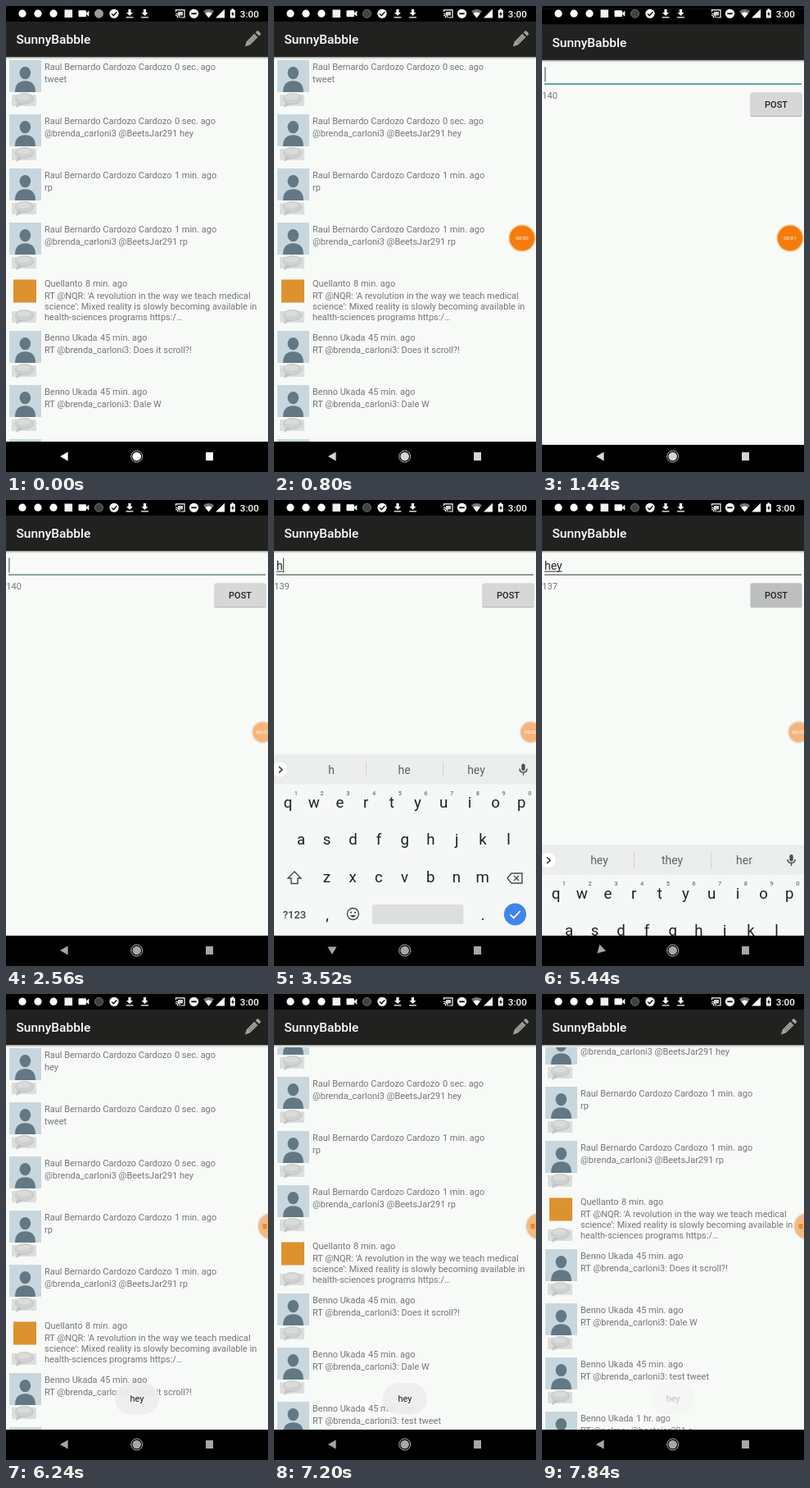
Animation, 320 px wide and 568 px high, one loop 8000 ms. Source, as an HTML page:

```html
<!DOCTYPE html>
<html lang="en">
<head>
<meta charset="utf-8">
<title>SunnyBabble</title>
<style>
html, body { margin: 0; width: 100%; height: 100%; overflow: hidden; background: #000; }
svg { display: block; width: 320px; height: 568px; font-family: Roboto, sans-serif; }
.body { font-size: 10.97px; fill: #747675; }
.title { font-size: 15.56px; font-weight: 500; fill: #fff; }
.mid { text-anchor: middle; }
.key { font-size: 18.7px; fill: #1d2123; text-anchor: middle; }
.hint { font-size: 7.5px; font-weight: 500; fill: #6f7476; text-anchor: middle; }
.sug { font-size: 14px; fill: #5d6365; text-anchor: middle; }
.line { fill: none; stroke: #454a4c; stroke-width: 1.4; }
</style>
</head>
<body>
<svg id="stage" viewBox="0 0 320 568"></svg>
<script>
const LOOP = 8000, STEP = 160, ROW = 66;
const ME = 'Raul Bernardo Cardozo Cardozo', PAL = 'Benno Ukada';
const A = '@brenda_carloni3', B = '@BeetsJar291';

const posts = [
  [ME, '0 sec. ago', 'hey'],
  [ME, '0 sec. ago', 'tweet'],
  [ME, '0 sec. ago', `${A} ${B} hey`],
  [ME, '1 min. ago', 'rp'],
  [ME, '1 min. ago', `${A} ${B} rp`],
  ['Quellanto', '8 min. ago', "RT @NQR: 'A revolution in the way we teach medical",
    "science': Mixed reality is slowly becoming available in", 'health-sciences programs https:/…'],
  [PAL, '45 min. ago', `RT ${A}: Does it scroll?!`],
  [PAL, '45 min. ago', `RT ${A}: Dale W`],
  [PAL, '45 min. ago', `RT ${A}: test tweet`],
  [PAL, '1 hr. ago', 'RT @pelmo: @beetsjar291 s']
];

const rect = (x, y, w, h, fill, more = '') =>
  `<rect x="${x}" y="${y}" width="${w}" height="${h}" fill="${fill}" ${more}/>`;
const disc = (x, y, r, fill, more = '') =>
  `<circle cx="${x}" cy="${y}" r="${r}" fill="${fill}" ${more}/>`;
const oval = (x, y, rx, ry, fill, more = '') =>
  `<ellipse cx="${x}" cy="${y}" rx="${rx}" ry="${ry}" fill="${fill}" ${more}/>`;
const path = (d, fill, more = '') => `<path d="${d}" fill="${fill}" ${more}/>`;
const text = (x, y, cls, s, more = '') => `<text x="${x}" y="${y}" class="${cls}" ${more}>${s}</text>`;

const person = rect(4, 4, 39, 39, '#c8d7de') +
  path('M11 43C11 34 15 29.3 23.5 29.3S36 34 36 43Z', '#627985') +
  oval(23.4, 19.6, 6.8, 7.7, '#627985');
const square = rect(9, 7.5, 28, 28, '#dc922f');
const reply = rect(7, 46, 30, 14, '#dcdedd', 'rx="1"') +
  path('M14 55L12 62L22 57Z', '#c3c5c4') +
  oval(22.5, 51, 11, 6.6, '#cfd1d0', 'stroke="#bbbdbc" stroke-width=".7"') +
  oval(21.5, 49, 8.5, 3.6, '#dadcdb');

function post([name, when, ...lines], i) {
  return `<g transform="translate(0 ${62 + i * ROW})">` +
    (lines.length > 1 ? square : person) + reply +
    text(47, 16, 'body', `${name}<tspan dx="3.5">${when}</tspan>`) +
    lines.map((s, n) => text(47, 31 + n * 13, 'body', s)).join('') + '</g>';
}

const appBar = rect(0, 62, 320, 1, '#a4a6a4') + rect(0, 63, 320, 1, '#d2d4d2') + rect(0, 64, 320, 1, '#eaecea') +
  rect(0, 0, 320, 19, '#000') + rect(0, 19, 320, 43, '#212220') +
  text(12.4, 46.3, 'title', 'SunnyBabble');
const pencil = `<g transform="translate(301 40.3) rotate(45)" fill="#a3a5a2">
  <path d="M-3-6.2H3V7L0 13L-3 7Z"/><path d="M-3-8.4V-10.8Q-3-12 -1.8-12H1.8Q3-12 3-10.8V-8.4Z"/>
  <path d="M-1-5V6.5M1.2-5V6.5" stroke="#5d5f5c" stroke-width=".7"/></g>`;

const feed = rect(0, 0, 320, 568, '#f8faf8') + '<g id="list"></g>' + appBar + pencil + rect(0, 531, 320, 37, '#000');

const compose = rect(0, 0, 320, 568, '#f8faf8') + appBar +
  rect(3, 90.4, 314, 1.5, '#2f8f86', 'id="rule"') +
  text(3, 84.5, 'input', '', 'id="input" font-size="14" fill="#232625"') +
  rect(3, 86.6, 0, 1, '#333', 'id="under"') +
  rect(3.4, 70.5, 1, 18, '#3b403e', 'id="caret"') +
  text(0.3, 109, 'body', '140', 'id="count"') +
  rect(254.5, 102, 63, 29.2, '#b9bbba', 'rx="1.6"') +
  rect(255, 101.3, 62, 28.6, '#d6d7d6', 'rx="1.6" id="post"') +
  text(286, 119.8, 'mid', 'POST', 'font-size="10.97" font-weight="500" fill="#222"') +
  rect(0, 531, 320, 37, '#000');

// Keyboard
const keyAt = {};
function keys(letters, x, y) {
  return [...letters].map((c, i) => {
    const kx = x + i * 31.7;
    keyAt[c] = [kx, y];
    return text(kx, y + 6, 'key', c);
  }).join('');
}
const keyboard = rect(0, 310, 320, 221, '#f6f8f7') + rect(0, 310, 320, 36.5, '#eceeed') +
  rect(112, 319, .8, 19, '#c9cccb') + rect(206, 319, .8, 19, '#c9cccb') +
  disc(7.5, 328.5, 9, '#fff') + path('M6 325L10 328.7L6 332.4', 'none', 'stroke="#333" stroke-width="1.5"') +
  [70, 159, 247].map((x, i) => text(x, 333.6, 'sug', '', `id="sug${i}"`)).join('') +
  rect(302.3, 321.5, 4.4, 8.4, '#4d5355', 'rx="2.2"') +
  path('M300 327.5Q300 332 304.5 332T309 327.5M304.5 332V335.5', 'none', 'class="line"') +
  keys('qwertyuiop', 17, 369) + keys('asdfghjkl', 33, 414) + keys('zxcvbnm', 64.5, 460) +
  [...'1234567890'].map((c, i) => text(27 + i * 31.7, 359.5, 'hint', c)).join('') +
  path('M25 453L33 461H29V467.5H21V461H17Z', 'none', 'class="line"') +
  path('M285 461L290 455H303V467H290Z M293 458L299 464M299 458L293 464', 'none', 'class="line"') +
  text(25, 509.5, 'mid', '?123', 'font-size="13" font-weight="500" fill="#3e4446"') +
  text(65, 512, 'key', ',') + text(255, 512, 'key', '.') +
  disc(96.5, 504.5, 7, 'none', 'class="line"') + disc(94, 502.8, 1.1, '#454a4c') + disc(99, 502.8, 1.1, '#454a4c') +
  path('M92.8 506Q96.5 511.5 100.2 506Z', '#454a4c') +
  rect(120, 493, 111.5, 24, '#dcdfde', 'rx="2"') +
  disc(294.5, 505, 13.6, '#4285ea') + path('M288.5 505.3L292.7 509.4L300.8 501', 'none', 'stroke="#fff" stroke-width="1.8"') +
  '<g id="pop">' + rect(-16.6, -74, 33.6, 94, '#000', 'rx="3" opacity=".13"') +
  rect(-15.8, -74, 32, 92, '#f5f7f6', 'rx="2.5"') +
  text(0, -42.5, 'mid', 'y', 'id="popKey" font-size="21" fill="#111"') +
  text(9.5, -35, 'mid', '…', 'font-size="9" fill="#222"') + '</g>';

// System chrome
const download = x => path(`M${x - 1.6} 4H${x + 1.6}V8H${x + 4}L${x} 12L${x - 4} 8H${x - 1.6}Z M${x - 4.4} 13.3H${x + 4.4}V14.6H${x - 4.4}Z`, '#fff');
const status = [20, 39, 58].map(x => disc(x, 9.2, 4.6, '#fff')).join('') +
  rect(71.5, 4.5, 9.6, 9.6, '#f0f0f0') +
  rect(88.5, 5.3, 9.5, 8, '#fff', 'rx="1.2"') + path('M98 8.5L101.3 5.8V12.8L98 10Z', '#fff') +
  disc(113.5, 9.3, 5, '#9a9c9b', 'id="dot"') +
  disc(132, 9.3, 5.6, '#fff') + path('M129 9.4L131.3 11.7L135.3 7.2', 'none', 'stroke="#000" stroke-width="1.3"') +
  download(151) + download(169.5) +
  path('M207.5 7V4.8H218V14H213.5', 'none', 'stroke="#fff" stroke-width="1.2"') +
  path('M207 9A5.5 5.5 0 0 1 212.3 14.4M207 11.4A3 3 0 0 1 210 14.4', 'none', 'stroke="#fff" stroke-width="1.1"') +
  rect(210, 7, 6, 4.5, '#fff', 'opacity=".8"') +
  disc(229.5, 9.3, 5.6, '#fff') + rect(226.3, 8.4, 6.4, 1.8, '#000') +
  path('M241 6.2Q247.5 1.8 254 6.2L247.5 14.4Z', '#777') + path('M243.3 9Q247.5 6 251.7 9L247.5 14.4Z', '#fff') +
  path('M256 14.4L267 3.8V14.4Z', '#fff') +
  path('M273.8 5H275.4V3.6H278.2V5H279.8V14.6H273.8Z', '#fff') + path('M277.5 6.3L275 10.3H276.6V13L278.8 9.1H277.3Z', '#000') +
  text(285.8, 13.6, '', '3:00', 'font-size="11.7" font-weight="500" fill="#fff"');
const nav = '<g id="nav">' + '<path id="back" d="M66 549L75.6 543.5V554.5Z"/>' +
  '<circle cx="159.7" cy="549" r="5.3"/><circle cx="159.7" cy="549" r="7" fill="none" stroke="#b4b7b4"/>' +
  '<rect x="244" y="544" width="9" height="10"/></g>';

const toast = '<g id="toast">' + rect(133, 474, 54, 38.5, '#ededed', 'rx="19.2" opacity=".94"') +
  text(160, 497, 'mid', 'hey', 'font-size="10.97" fill="#1c1c1c"') + '</g>';
const bubble = '<g id="bubble">' + disc(0, 0, 16, '#f57c0a', 'id="ball" stroke-width="1.6"') +
  text(0, 2.2, 'mid', '', 'id="clock" font-size="6.2" fill="#fff"') +
  path('M-10.5-3H-5.5V2.5L-8 3.8L-10.5 2.5Z', '#ef8a1d', 'id="cam"') + '</g>';

document.getElementById('stage').innerHTML =
  `<defs><clipPath id="clip"><rect width="320" height="531"/></clipPath></defs>` +
  feed + `<g id="compose">${compose}</g><g clip-path="url(#clip)"><g id="kb">${keyboard}</g></g>` +
  toast + status + nav + bubble;

const el = {};
document.querySelectorAll('[id]').forEach(n => el[n.id] = n);
const set = (id, attrs) => { for (const k in attrs) el[id].setAttribute(k, attrs[k]); };
const show = (id, on) => { el[id].style.display = on ? '' : 'none'; };
const move = (id, x, y) => set(id, { transform: `translate(${x} ${y})` });
const clamp = v => Math.max(0, Math.min(1, v));
const prog = (t, from, span) => clamp((t - from) / span);
const at = (steps, t) => steps.filter(s => s[0] <= t).pop();
function glide(points, t) {
  const i = points.findIndex(p => p[0] > t);
  if (i === 0) return points[0][1];
  if (i < 0) return points[points.length - 1][1];
  const [a, b] = [points[i - 1], points[i]];
  return a[1] + (b[1] - a[1]) * (t - a[0]) / (b[0] - a[0]);
}

const typed = [[0, ''], [3360, 'h'], [3840, 'he'], [4640, 'hey']];
const presses = [[0, ''], [3200, 'h'], [3360, ''], [3680, 'e'], [3840, ''], [4480, 'y'], [4640, '']];
const guesses = { '': ['', '', ''], h: ['h', 'he', 'hey'], he: ['he', 'hello', 'hey'], hey: ['hey', 'they', 'her'] };
const scroll = [[6400, 0], [7200, 97], [7840, 151]];
const rules = [[0, '#2f8f86'], [2400, '#6b8d84'], [2880, '#757a77']];
const navTints = [[0, '#fff'], [320, '#d2d5d2'], [2400, '#a4a8a4']];
const OPEN = 1280, CLOSE = 5440, SLIDE = 45;

let updated = null;
function render(t) {
  const fresh = t >= CLOSE;
  if (updated !== fresh) {
    updated = fresh;
    el.list.innerHTML = (fresh ? posts : posts.slice(1)).map(post).join('');
  }
  move('list', 0, -glide(scroll, t));

  // Compose window: quick fade up on opening, drop and fade on closing
  const rise = (1 - prog(t, OPEN, 350)) ** 4, drop = prog(t, CLOSE, 250) ** 4;
  const alpha = (1 - (1 - prog(t, OPEN, 200)) ** 4) * (1 - prog(t, CLOSE + 100, 150));
  move('compose', 0, SLIDE * (rise + drop));
  set('compose', { opacity: alpha });
  set('rule', { fill: at(rules, t)[1] });
  set('post', { fill: t >= 5280 && t < 5600 ? '#bdbfbe' : '#d6d7d6' });

  const [since, word] = at(typed, t);
  el.input.textContent = word;
  el.count.textContent = 140 - word.length;
  const width = word ? el.input.getComputedTextLength() : 0;
  set('under', { width });
  set('caret', { x: 3.4 + width });
  show('caret', Math.floor((t - (since || 1440)) / 500) % 2 === 0);

  const kb = (1 - (1 - prog(t, 2800, 200)) ** 2) * (1 - prog(t, 5360, 160));
  move('kb', 0, 221 * (1 - kb));
  set('back', { transform: `rotate(${-90 * kb} 71 549)` });
  guesses[word].forEach((s, i) => el['sug' + i].textContent = s);
  const down = at(presses, t)[1];
  show('pop', down);
  if (down) {
    move('pop', ...keyAt[down]);
    el.popKey.textContent = down;
  }

  set('toast', { opacity: prog(t, 5600, 320) * clamp((7880 - t) / 160) });
  set('nav', { fill: at(navTints, t)[1] });
  set('dot', t < 320 ? { fill: '#9a9c9b', stroke: '#9a9c9b' } : { fill: '#3c4340', stroke: '#6d7370' });

  // Recorder bubble
  const docked = t >= 2400, tucked = t >= 5760;
  show('bubble', t >= 320);
  move('bubble', tucked ? 324 : docked ? 313.5 : 303, 283);
  set('ball', {
    r: docked && !tucked ? 12.6 : 16,
    fill: tucked ? '#efba88' : docked ? '#f5b47b' : '#f57c0a',
    stroke: docked ? '#ead5bf' : '#f3cda4'
  });
  el.clock.textContent = tucked ? '' : '00:0' + Math.floor(t / 1000);
  show('cam', tucked);
}

const start = performance.now();
function tick() {
  const t = (performance.now() - start) % LOOP;
  render(Math.floor(t / STEP) * STEP);
  requestAnimationFrame(tick);
}
tick();
</script>
</body>
</html>
```
